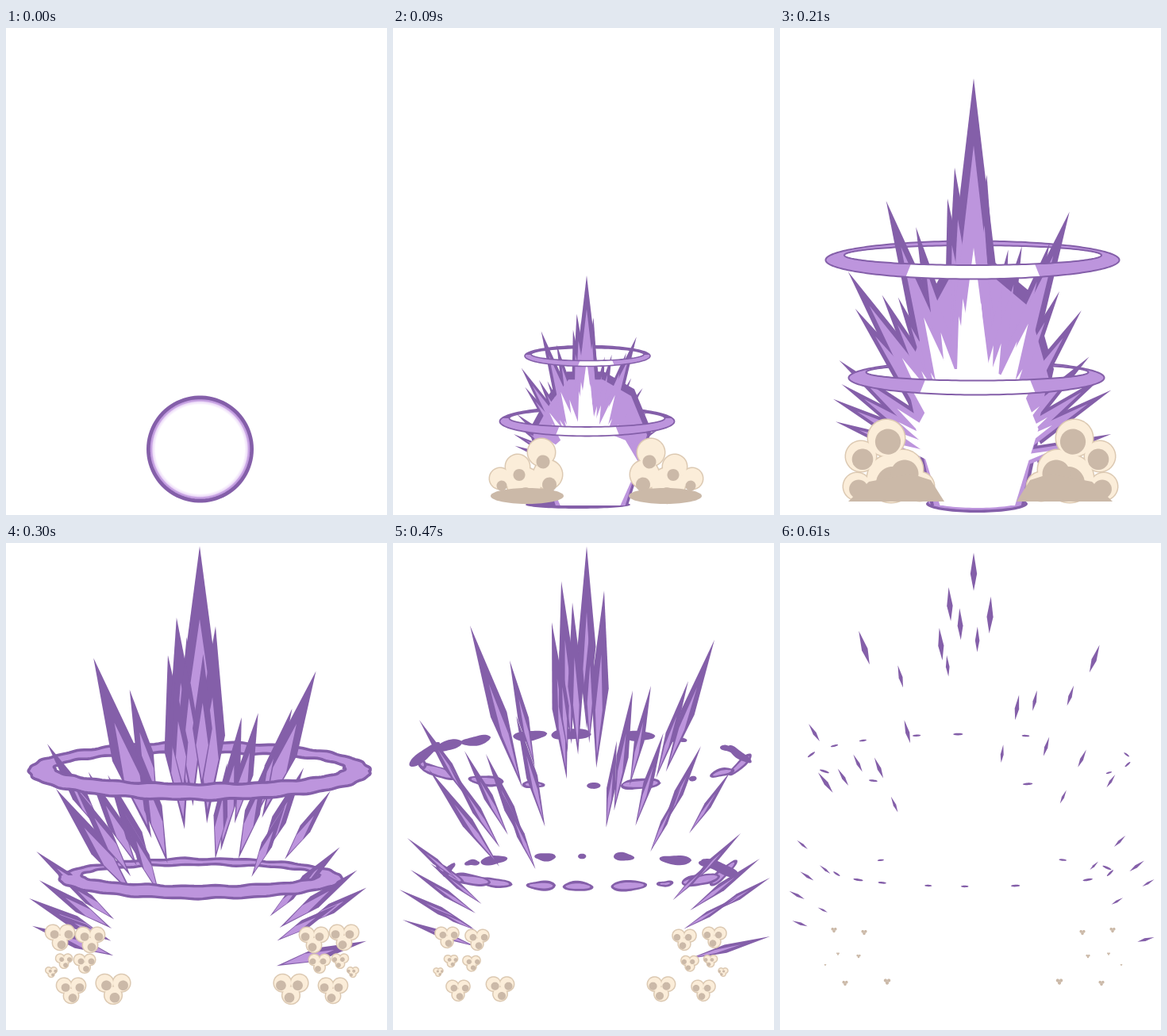
These frames come from a looping animation (480 by 614 pixels, 0.7 s). An HTML page with a canvas:

```html
<!DOCTYPE html>
<html lang="en">
<head>
<meta charset="utf-8">
<title>Energy burst</title>
<style>
  html, body { margin: 0; width: 100%; height: 100%; overflow: hidden; background: #fff; }
  canvas { display: block; width: 480px; height: 614px; }
</style>
</head>
<body>
<canvas id="stage" width="480" height="614"></canvas>
<script>
const ctx = document.getElementById('stage').getContext('2d');
const DARK = '#845fa9', LIGHT = '#bd95dd', WHITE = '#fff';
const CREAM = '#fbedd9', TAN = '#cbb9a8', RIM = '#dcc9b2';
const TAU = Math.PI * 2;

// Seeded random number from 0 to 1
function rand(n) {
  const v = Math.sin(n * 127.1 + 11.7) * 43758.5453;
  return v - Math.floor(v);
}

function fill(path, color, rule = 'nonzero') {
  ctx.fillStyle = color;
  ctx.fill(path, rule);
}

function stroke(path, color, width) {
  ctx.strokeStyle = color;
  ctx.lineWidth = width;
  ctx.stroke(path);
}

function clipped(path, draw, rule = 'nonzero') {
  ctx.save();
  ctx.clip(path, rule);
  draw();
  ctx.restore();
}

function poly(points) {
  const path = new Path2D();
  points.forEach(([x, y]) => path.lineTo(x, y));
  path.closePath();
  return path;
}

// Ellipse with an optional wavy edge
function oval(x, y, rx, ry, turn = 0, rough = 0) {
  const points = [], steps = Math.ceil(rx) + 24, waves = Math.max(3, Math.round(rx / 7));
  for (let i = 0; i < steps; i++) {
    const a = i / steps * TAU;
    const n = rough * (Math.sin(waves * a + x) + Math.sin(waves * .6 * a + y)) / 2;
    const u = Math.cos(a) * (rx + n), v = Math.sin(a) * (ry + n);
    points.push([x + u * Math.cos(turn) - v * Math.sin(turn), y + u * Math.sin(turn) + v * Math.cos(turn)]);
  }
  return poly(points);
}

// Draws on the left and again mirrored about the axis
function mirrored(axis, draw) {
  draw();
  ctx.save();
  ctx.translate(axis * 2, 0);
  ctx.scale(-1, 1);
  draw();
  ctx.restore();
}

// ---- Rays: every spike points away from one focus and ends at its tip

const FOCUS = [244, 560], MIDDLE = 13;
const TIPS = [
  [12, 475], [8, 437], [22, 412], [18, 372], [45, 285], [33, 223], [90, 262], [117, 266], [97, 104],
  [147, 148], [200, 100], [212, 48], [226, 75], [244, 4], [266, 60], [302, 186], [325, 180], [372, 174],
  [405, 122], [388, 256], [425, 288], [438, 366], [462, 398], [475, 422], [475, 496]
];
const ray = (x, y, i) => ({ dx: x - FOCUS[0], dy: y - FOCUS[1], size: .75 + .5 * rand(i), middle: i === MIDDLE });
const RAYS = TIPS.map(([x, y], i) => ray(x, y, i));
// Smaller spikes lower down beside every second ray
const TWINS = RAYS.filter((r, i) => i % 2).map((r, i) =>
  ray(FOCUS[0] + r.dx * .83 + 22 * (rand(i + 60) - .5), FOCUS[1] + r.dy * .83, i + 30));

// Point at a share of the ray, moved sideways by a share of its length
const along = (r, share, side = 0) =>
  [FOCUS[0] + r.dx * share - r.dy * side, FOCUS[1] + r.dy * share + r.dx * side];

function kite(r, tip, tail, width) {
  const belly = tip + (tail - tip) * .55;
  return poly([along(r, tip), along(r, belly, width / 2), along(r, tail), along(r, belly, -width / 2)]);
}

// reach, length and width are shares of the ray
function streaks({ reach, lead = reach, length, width, glow = 0 }) {
  [...RAYS, ...TWINS].forEach(r => {
    const tip = r.middle ? lead : reach, long = length * r.size, wide = width * r.size;
    fill(kite(r, tip, tip - long, wide), DARK);
    if (glow) fill(kite(r, tip - long * .36, tip - long * .93, wide * glow), LIGHT);
  });
}

// ---- The rooted burst: nested layers of a cone with spikes

const CONE = [[190, 602], [152, 430], [182, 350], [212, 295], [270, 295], [318, 335], [345, 430], [308, 602]];
const LAYERS = [
  { color: DARK, tip: 1, root: .45, half: .065, sx: 1, sy: 1 },
  { color: LIGHT, tip: .83, root: .38, half: .052, sx: .93, sy: .94 },
  { color: WHITE, tip: .57, root: .18, half: .05, sx: .8, sy: .56 }
];

function rooted({ reach, lead, sx, sy }) {
  LAYERS.forEach(layer => {
    fill(poly(CONE.map(([x, y]) => [248 + (x - 248) * sx * layer.sx, 602 + (y - 602) * sy * layer.sy])), layer.color);
    RAYS.forEach(r => {
      const k = r.middle ? lead : reach;
      fill(poly([along(r, k * layer.tip), along(r, k * layer.root, k * layer.half), along(r, k * layer.root, -k * layer.half)]), layer.color);
    });
  });
}

// ---- Rings

// outer and hole: [x, y, rx, ry]; shine: [left, right] of the white part in front
function ring(outer, hole, { rough = 0, edge = 2, back = LIGHT, shine } = {}) {
  const rim = oval(...outer, 0, rough), gap = oval(...hole, 0, rough), band = new Path2D(rim);
  band.addPath(gap);
  const split = Math.round(hole[1]);
  return front => clipped(poly([[0, front ? split : 0], [480, front ? split : 0], [480, front ? 614 : split], [0, front ? 614 : split]]), () => {
    fill(band, front ? LIGHT : back, 'evenodd');
    if (front && shine) {
      const [l, r] = shine, y = outer[1];
      clipped(band, () => fill(poly([[l + 12, y], [r - 12, y], [r, y + 30], [l, y + 30]]), WHITE), 'evenodd');
    }
    stroke(rim, DARK, edge);
    stroke(gap, DARK, edge);
  });
}

// Broken ring: pieces spread round an ellipse, lit in front only
function pieces([x, y, rx, ry], seed, { long, thick, skip = 0, glow }) {
  const count = 18;
  for (let i = 0; i < count; i++) {
    const size = rand(seed + i);
    if (size < skip) continue;
    const a = (i + .5 + .5 * (rand(seed + i + 40) - .5)) / count * TAU;
    const turn = Math.atan(-ry / rx / Math.tan(a));
    const px = x + rx * Math.cos(a), py = y + ry * Math.sin(a);
    const w = (3 + 23 * size) * long, h = (3 + 4 * size) * thick;
    fill(oval(px, py, w, h, turn, h > 4 ? 1.4 : 0), DARK);
    if (glow && w > 9 && py > y) fill(oval(px, py, w - 4, h - 2.8, turn, .7), LIGHT);
  }
}

function brokenRings(look) {
  pieces([238, 273.5, 203, 32.5], 1, look);
  pieces([243, 414, 174, 19], 7, look);
}

// ---- Dust

function blobs(list, color, rim) {
  if (rim) list.forEach(([x, y, r]) => fill(oval(x, y, r + 1.5, r + 1.5), rim));
  list.forEach(([x, y, r]) => fill(oval(x, y, r, r), color));
}

// Puffed cloud: each lobe has a shade of a given share, lowered by a share of its radius
function cloud(lobes, share, drop) {
  blobs(lobes, CREAM, RIM);
  blobs(lobes.map(([x, y, r]) => [x + 2, y + r * drop, r * share]), TAN);
}

const CLUMPS = [[68, 497, 11], [106, 500, 11], [73, 527, 6], [99, 530, 8], [57, 541, 4], [82, 564, 11], [135, 562, 13]];

function clumps(axis, scale, lift) {
  const lobes = CLUMPS.flatMap(([x, y, r]) => [-.65, .65, 0].map((side, i) =>
    [x + side * r * scale, y - lift + (i < 2 ? -.45 : .5) * r * scale, r * scale * .65]));
  mirrored(axis, () => scale > .3 ? cloud(lobes, .6, .3) : blobs(lobes, TAN));
}

// ---- Poses

function circle() {
  const glow = ctx.createRadialGradient(244.5, 531, 56, 244.5, 531, 64);
  glow.addColorStop(0, '#fff');
  glow.addColorStop(.45, '#eddcf8');
  glow.addColorStop(.6, '#c9a6e4');
  glow.addColorStop(1, '#b78fd6');
  fill(oval(244.5, 531, 65, 65), glow);
  stroke(oval(244.5, 531, 65.2, 65.2), DARK, 4.6);
}

function rise() {
  const rings = [
    ring([245, 413.5, 79, 13], [245, 411.5, 71, 8], { edge: 1.6, back: DARK, shine: [226, 286] }),
    ring([244.5, 496, 110, 18.5], [244.5, 492, 98, 11], { edge: 1.8, back: DARK, shine: [200, 290] })
  ];
  rings.forEach(draw => draw(false));
  fill(oval(233, 601, 66, 5), DARK);
  rooted({ reach: .39, lead: .446, sx: .8, sy: .55 });
  rings.forEach(draw => draw(true));
  mirrored(256, () => {
    cloud([[135, 568, 13], [157, 553, 15], [187, 535, 17], [195, 563, 18], [165, 575, 21]], .5, .7);
    fill(oval(169, 590, 46, 10), TAN);
  });
}

function burst() {
  const rings = [
    ring([242.5, 292.5, 185, 24], [243, 286.5, 162, 12.5], { shine: [155, 331] }),
    ring([247.5, 441, 161, 21.5], [248.5, 434, 140, 10.5], { shine: [172, 326] })
  ];
  rings.forEach(draw => draw(false));
  fill(oval(248, 600, 64, 11), DARK);
  fill(oval(248, 598, 61, 9.5), LIGHT);
  fill(oval(248, 597, 55, 8), WHITE);
  rooted({ reach: .75, lead: .893, sx: 1, sy: 1 });
  rings.forEach(draw => draw(true));
  mirrored(252.5, () => {
    cloud([[97, 578, 17], [140, 568, 30], [155, 557, 25], [176, 578, 18], [102, 540, 19], [134, 517, 23]], .7, .2);
    fill(poly([[86, 597], [112, 572], [165, 562], [190, 570], [207, 597]]), TAN);
  });
}

function breakUp() {
  const rings = [
    ring([244, 287.5, 215, 36], [244, 284, 183, 20], { rough: 1.3, edge: 3.6 }),
    ring([245, 423, 178, 25], [245, 419, 150, 13.5], { rough: 1.2, edge: 3.4 })
  ];
  rings.forEach(draw => draw(false));
  streaks({ reach: .91, lead: 1, length: .4, width: .058, glow: .62 });
  rings.forEach(draw => draw(true));
  clumps(247, 1.25, 0);
}

function fragments() {
  brokenRings({ long: 1, thick: 1, glow: true });
  streaks({ reach: 1, length: .36, width: .036, glow: .4 });
  clumps(236.5, 1, 0);
}

function scatter() {
  brokenRings({ long: .33, thick: .65 });
  streaks({ reach: 1.005, length: .21, width: .02 });
  clumps(245, .55, 6);
}

function fade() {
  brokenRings({ long: .24, thick: .2, skip: .5 });
  streaks({ reach: .985, length: .075, width: .013 });
  clumps(243.5, .25, 9);
}

// [start in ms, pose]
const STEPS = [[0, circle], [90, rise], [210, burst], [300, breakUp], [390, fragments], [520, scatter], [610, fade]];
const LOOP = 700;
const start = performance.now();
let shown;

function tick() {
  const t = Math.max(0, performance.now() - start) % LOOP;
  const pose = STEPS.filter(([from]) => from <= t).pop()[1];
  if (pose !== shown) {
    ctx.fillStyle = WHITE;
    ctx.fillRect(0, 0, 480, 614);
    pose();
    shown = pose;
  }
  requestAnimationFrame(tick);
}
tick();
</script>
</body>
</html>
```
